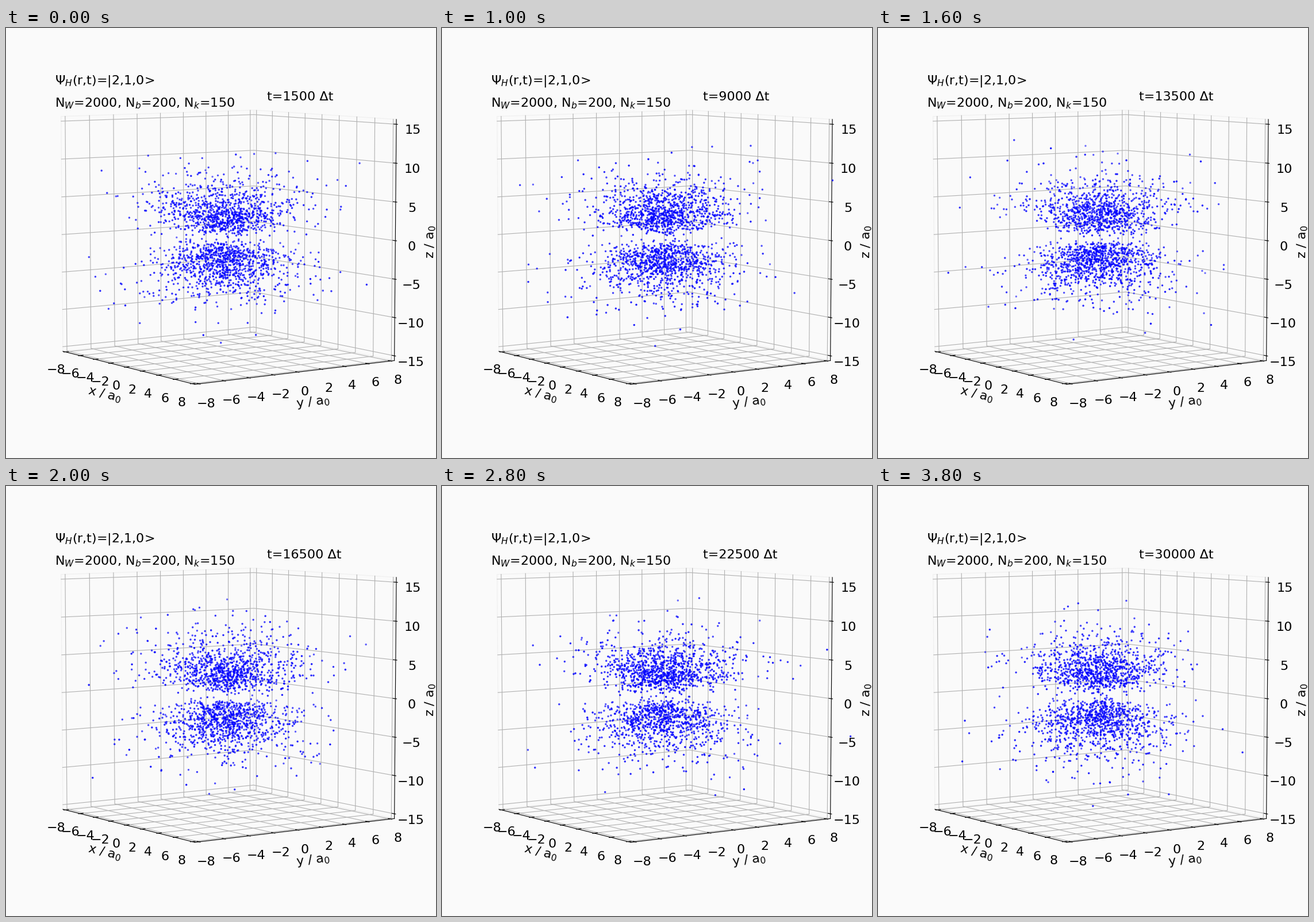
Write a matplotlib script that moves like this. It is 748 by 748 pixels and loops after 4000 ms.

```python
import numpy as np
import matplotlib.pyplot as plt
from matplotlib.animation import FuncAnimation
from matplotlib.collections import LineCollection

SIZE, DPI = 748, 100
FRAMES, INTERVAL = 20, 200
WALKERS = 2000
STEP = 1500

# Camera: a unit data cube, seen inside a square area with a 24 px margin
AZIM, ELEV = np.radians(-35), np.radians(6)
DIST = 10 / 1.0562
PAD = 24
AREA = SIZE - 2 * PAD
FOCAL = AREA / 0.185
CX, CY = PAD + 0.095 * FOCAL, PAD + 0.09 * FOCAL
SPAN = np.array([16, 16, 30])
EDGE = 0.5 + 1 / 48      # half side of the drawn box
LABEL = EDGE + 0.0495    # distance of tick labels from the centre

ca, sa, ce, se = np.cos(AZIM), np.sin(AZIM), np.cos(ELEV), np.sin(ELEV)
RIGHT = np.array([-sa, ca, 0])
UP = np.array([-se * ca, -se * sa, ce])
TOWARD = np.array([ce * ca, ce * sa, se])


def project(points):
    """Cube coordinates to stage pixels and nearness."""
    points = np.asarray(points, float)
    near = points @ TOWARD
    scale = FOCAL / (DIST - near)
    xy = np.stack([CX + scale * (points @ RIGHT),
                   CY - scale * (points @ UP)], axis=-1)
    return xy, near


def lines(paths, color, width, z):
    segs = [project(p)[0] for p in paths]
    ax.add_collection(LineCollection(segs, colors=color, linewidths=width,
                                     capstyle="projecting", zorder=z))


def words(x, y, s, **kw):
    return ax.text(x, y, s, fontsize=16, color="black", zorder=4, **kw)


plt.rcParams["font.family"] = "DejaVu Sans"
plt.rcParams["mathtext.fontset"] = "dejavusans"
fig = plt.figure(figsize=(SIZE / DPI, SIZE / DPI), dpi=DPI, facecolor="#fafafa")
ax = fig.add_axes([0, 0, 1, 1])
ax.set_xlim(0, SIZE)
ax.set_ylim(SIZE, 0)
ax.axis("off")

E = EDGE
left, back = (-E, -E, -E), (-E, E, -E)
front, right = (E, -E, -E), (E, E, -E)
left_top, back_top, right_top = (-E, -E, E), (-E, E, E), (E, E, E)

lines([[left, back, back_top, left_top, left],
       [back, right, right_top, back_top, back],
       [left, front, right, back, left]], "#f1f1f1", 1, 1)

grid, ticks = [], []
out, inn = E + 0.1 / 12, E - 0.2 / 12


def tick_label(pos, value):
    (x, y), _ = project(pos)
    words(x, y + 0.8, str(value).replace("-", "\u2212"), ha="center", va="top")


for v in range(-8, 9, 2):
    p = v / SPAN[0]
    grid += [[(p, -E, -E), (p, E, -E), (p, E, E)],
             [(E, p, -E), (-E, p, -E), (-E, p, E)]]
    ticks += [[(p, -out, -E), (p, -inn, -E)], [(out, p, -E), (inn, p, -E)]]
    tick_label((p, -LABEL, -LABEL), v)
    tick_label((LABEL, p, -LABEL), v)
for v in range(-15, 16, 5):
    p = v / SPAN[2]
    grid.append([(-E, -E, p), (-E, E, p), (E, E, p)])
    ticks.append([(out, E, p), (inn, E, p)])
    tick_label((LABEL, LABEL, p), v)

lines(grid, "#b0b0b0", 0.8, 2)
lines([[left, front], [front, right], [right, right_top]], "black", 0.8, 3)
lines(ticks, "black", 0.8, 3)

for name, x, y, angle in (("x", 171.5, 637.5, -13.8), ("y", 534.5, 650.5, 6.8),
                          ("z", 738, 371.5, 89.5)):
    words(x, y, name + " / a$_0$", rotation=angle, ha="center", va="center",
          rotation_mode="anchor")

words(85, 97, r"$\Psi_H$(r,t)=|2,1,0>")
words(85, 137, "N$_W$=2000, N$_b$=200, N$_k$=150")
clock = words(454.4, 126, "")

cloud = ax.scatter(np.zeros(WALKERS), np.zeros(WALKERS), s=1, linewidths=1.5,
                   color="blue", zorder=5)


def walkers(frame):
    """Positions drawn from the 2p (m = 0) density r^4 exp(-r) cos^2."""
    rng = np.random.default_rng(210 + frame)
    r = np.minimum(rng.gamma(5, 1, WALKERS), 14)
    c = np.cbrt(rng.uniform(-1, 1, WALKERS))
    phi = rng.uniform(0, 2 * np.pi, WALKERS)
    s = np.sqrt(1 - c * c)
    return np.stack([r * s * np.cos(phi), r * s * np.sin(phi), r * c], axis=-1)


def update(frame):
    xy, near = project(walkers(frame) / SPAN)
    order = np.argsort(near)
    near = near[order]
    rgba = np.zeros((WALKERS, 4))
    rgba[:, 2] = 1
    rgba[:, 3] = 0.45 + 0.55 * (near - near[0]) / (near[-1] - near[0])
    cloud.set_offsets(xy[order])
    cloud.set_color(rgba)
    clock.set_text(f"t={STEP * (frame + 1)} \u0394t")
    return cloud, clock


anim = FuncAnimation(fig, update, frames=FRAMES, interval=INTERVAL,
                     init_func=lambda: update(0), repeat=True, repeat_delay=0)
plt.show()
```
